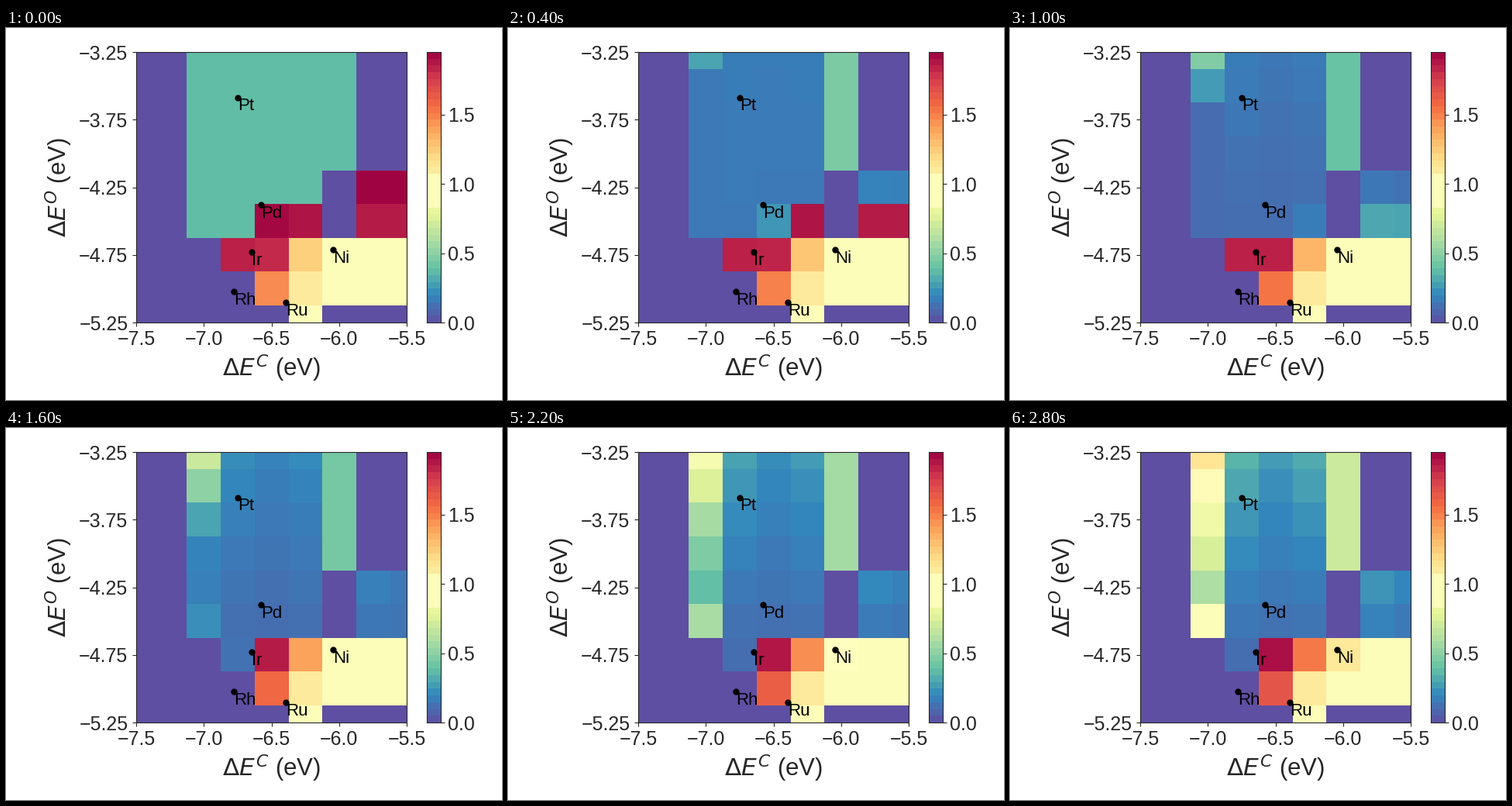
Animation, 640 px wide and 480 px high, one loop 3000 ms. Source, as a matplotlib script:

```python
import numpy as np
import matplotlib.pyplot as plt
from matplotlib.animation import FuncAnimation

W, H, DPI = 640, 480, 100
VMAX = 1.952
FLOOR, START, PALE = 0.10, 0.38, 0.95
INK = "#262626"
FRAMES, INTERVAL = 15, 200
LAST = FRAMES - 1

plt.rcParams.update({
    "font.family": "Liberation Sans",
    "text.color": INK, "axes.edgecolor": INK,
    "xtick.color": INK, "ytick.color": INK,
    "axes.linewidth": 0.8,
})

# The map is a 9 x 9 grid: rows run down the O energy, columns along the C energy.
ROWS = np.arange(9)[:, None]
UPPER = np.arange(6)

# Cells that take part in the cooling and slow warming
active = np.zeros((9, 9), bool)
active[:6, 2:6] = True
active[4:6, 7:] = True
active[6, 3] = True

# Step at which a hot cell drops to the plateau
drop = np.zeros((9, 9))
drop[4, 7:] = 0.3
drop[5, 4] = 1.1
drop[5, 5] = 3.1
drop[5, 7:] = 4.3
drop[6, 3] = 5.1

# Late warming: strongest at the top, weakest in the middle column
gain = np.array([0, 0, 0, 0.25, 0.16, 0.22, 0, 0.5, 0.34])
warming = gain * np.clip(1 - ROWS / 7, 0, 1) ** 1.5

# The left edge heats far more, and lower rows set in later
edge_gain = np.interp(UPPER, [0, 4, 5], [1.03, 0.5, 0.85])
edge_delay = np.minimum(3 * UPPER, 7)


def activity(i):
    p = i / LAST
    age = np.maximum(i - drop, 0)
    cool = FLOOR + (START - FLOOR) * np.exp(-0.72 * age ** 1.3)
    z = np.where(i < drop, 1.95 - 0.02 * drop, cool + warming * p ** 1.3)
    z[~active] = 0

    rise = np.clip((i - edge_delay) / (LAST - edge_delay), 0, 1)
    z[:6, 2] += edge_gain * rise
    z[:4, 6] = np.interp(i, [0, 1, 5, 8, LAST], [START, 0.47, 0.40, 0.44, 0.70])

    # Warm ridge and the pale corner beside it
    z[6:8, 6:] = z[8, 5] = PALE
    z[6, 6] += 0.17 * p ** 8
    z[6, 4] = 1.82 + 0.08 * p
    z[7, 4] = 1.47 + 0.19 * p
    z[6, 5] = 1.23 + 0.29 * p
    z[7, 5] = 1.10
    return z


def pixel_axes(x, y, w, h, pad):
    ax = fig.add_axes([x / W, 1 - (y + h) / H, w / W, h / H])
    ax.tick_params(labelsize=18, length=3.5, pad=3.5, width=0.8)
    ax.tick_params(axis="y", pad=pad)
    return ax


fig = plt.figure(figsize=(W / DPI, H / DPI), dpi=DPI, facecolor="white")
style = dict(cmap="Spectral_r", vmin=0, vmax=VMAX, aspect="auto",
             interpolation="nearest")

ax = pixel_axes(168.2, 31.05, 349, 349, pad=4.2)
heat = ax.imshow(activity(0), extent=(-7.625, -5.375, -5.375, -3.125), **style)
ax.set_xlim(-7.5, -5.5)
ax.set_ylim(-5.25, -3.25)
ax.set_xticks(np.arange(-7.5, -5.4, 0.5))
ax.set_yticks(np.arange(-5.25, -3.2, 0.5))

METALS = {"Pt": (-6.75, -3.585), "Pd": (-6.58, -4.38), "Ir": (-6.645, -4.73),
          "Ni": (-6.045, -4.71), "Rh": (-6.78, -5.02), "Ru": (-6.395, -5.103)}
for name, (x, y) in METALS.items():
    ax.plot(x, y, "o", color="black", ms=6, mew=0)
    ax.text(x, y - 0.004, name, size=16, color="black", ha="left", va="top")

label = dict(size=22.5, ha="center", va="baseline", rotation_mode="anchor")
fig.text(343 / W, 1 - 449 / H, r"$\Delta E^{C}$ (eV)", **label)
fig.text(78 / W, 1 - 205 / H, r"$\Delta E^{O}$ (eV)", rotation=90, **label)

# Colour scale in bands, with one wide pale band in the middle
bar = pixel_axes(543.1, 31.05, 349 / 20, 349, pad=3.5)
bands = (np.arange(40) + 0.5) * VMAX / 40
bands[(bands > 0.82) & (bands < 1.08)] = PALE
bar.imshow(bands[:, None], origin="lower", extent=(0, 1, 0, VMAX), **style)
bar.set_xticks([])
bar.yaxis.tick_right()
bar.set_yticks([0, 0.5, 1, 1.5])


def draw(i):
    heat.set_data(activity(i))
    return [heat]


anim = FuncAnimation(fig, draw, frames=FRAMES, interval=INTERVAL,
                     repeat=True, repeat_delay=0, blit=False)
plt.show()
```
